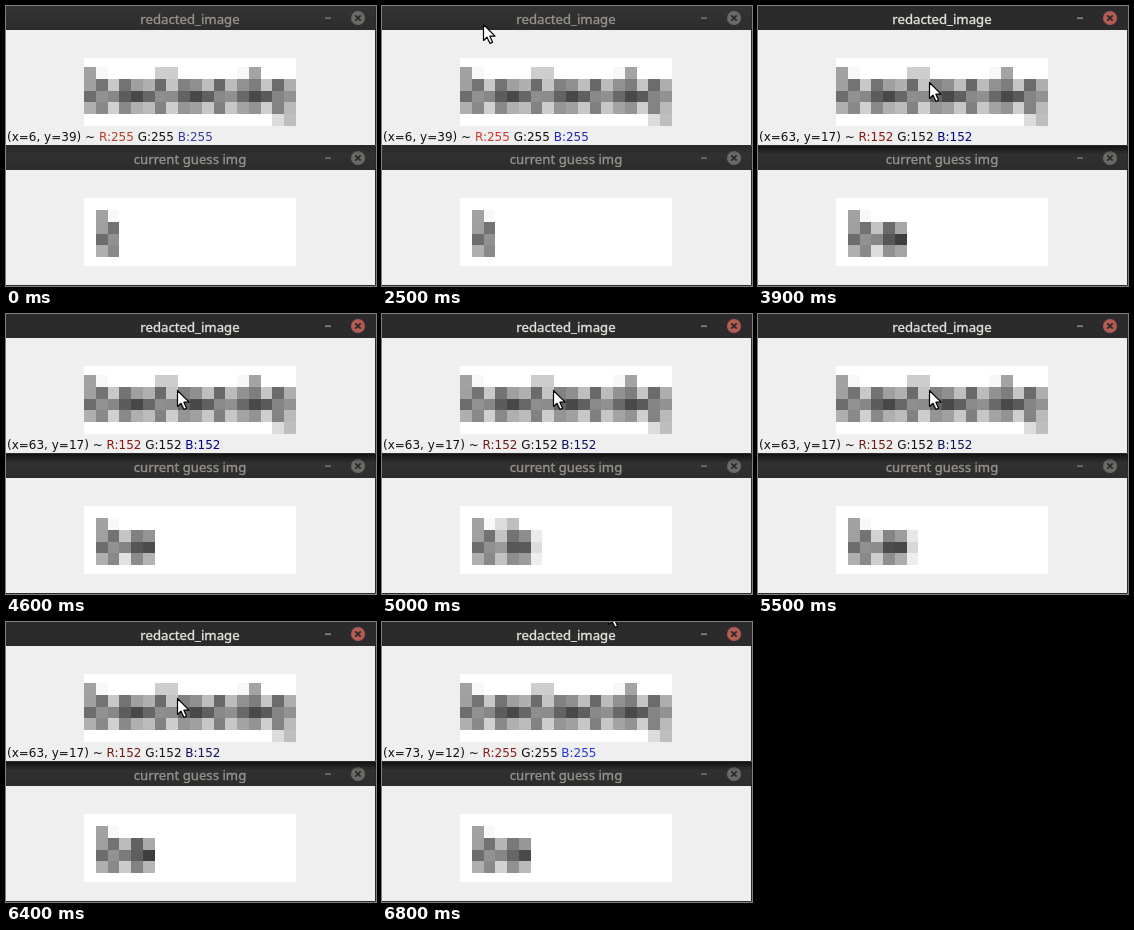
An HTML page that plays this animation: 370 px wide and 280 px high, repeating every 6900 ms.

```html
<!DOCTYPE html>
<html lang="en">
<head>
<meta charset="utf-8">
<style>
html, body { margin: 0; width: 100%; height: 100%; overflow: hidden; background: #efefef; }
svg { display: block; width: 370px; height: 280px; }
.title { font: 500 13.2px "Noto Sans", sans-serif; text-anchor: middle; stroke: currentColor; stroke-width: .35px; fill: currentColor; }
.status { font: 12px "DejaVu Sans", sans-serif; white-space: pre; }
</style>
</head>
<body>
<svg id="stage" viewBox="0 0 370 280" xmlns="http://www.w3.org/2000/svg">
  <defs>
    <linearGradient id="bar" x1="0" y1="0" x2="0" y2="1">
      <stop offset="0" stop-color="#343434"/><stop offset="1" stop-color="#2c2c2c"/>
    </linearGradient>
    <linearGradient id="shade" x1="0" y1="0" x2="0" y2="1">
      <stop offset="0" stop-color="#000" stop-opacity=".65"/><stop offset="1" stop-color="#000" stop-opacity="0"/>
    </linearGradient>
  </defs>
</svg>
<script>
const LOOP = 6900;
const CELL = 11.78;
const COLS = 18;
const stage = document.getElementById("stage");

function add(tag, attrs, parent = stage, text) {
  const node = document.createElementNS("http://www.w3.org/2000/svg", tag);
  for (const key in attrs) node.setAttribute(key, attrs[key]);
  if (text) node.textContent = text;
  return parent.appendChild(node);
}

const clamp = (v, lo, hi) => Math.min(hi, Math.max(lo, v));
const at = (list, t) => list.reduce((hit, item) => item[0] <= t ? item : hit);

function noise(n) {
  const s = Math.sin(n * 12.9898) * 43758.5453;
  return s - Math.floor(s);
}

function makeWindow(y, name) {
  const g = add("g", { transform: `translate(0 ${y})` });
  add("rect", { width: 370, height: 140, fill: "#efefef" }, g);
  const bar = add("rect", { width: 369, height: 24, fill: "url(#bar)" }, g);
  add("path", { d: "M369.5 0V139.5H0", fill: "none", stroke: "#2a2a2a" }, g);
  const title = add("text", { class: "title", x: 184, y: 18, color: "#96928c" }, g, name);
  const dash = add("rect", { x: 319, y: 11.5, width: 6, height: 1.3, fill: "#807e7a" }, g);
  const close = add("circle", { cx: 352, cy: 12, r: 7, fill: "#6c6a67" }, g);
  add("path", { d: "M349.3 9.3l5.4 5.4m0-5.4l-5.4 5.4", stroke: "#2b2b2b", "stroke-width": 1.7 }, g);
  add("rect", { x: 78, y: 52, width: 212, height: 68, fill: "#fff" }, g);
  return { g, bar, title, dash, close };
}

// Strokes one cell wide, averaged over the cells they straddle.
const strokes = (c, places) =>
  255 - 100 * places.reduce((sum, p) => sum + Math.max(0, 1 - Math.abs(c - p)), 0);

// Pixelated writing: letter gaps recur along each row, with tall and hanging strokes around them.
function letterShade(r, c, tall = [.07, 6.5, 13.92]) {
  const gap = Math.cos(2.44 * (c - 2));
  return [
    strokes(c, tall),
    152 + 48 * gap,
    110 + 38 * Math.cos(1.22 * (c - 1.3)),
    168 + 40 * gap,
    strokes(c, [16.65])
  ][r];
}

function drawCells(parent, rows, cols, x0, y0, shade) {
  for (let r = 0; r < rows; r++) for (let c = 0; c < cols; c++) {
    const v = Math.round(clamp(shade(r, c), 0, 255));
    const x = Math.round(x0 + c * CELL), y = Math.round(y0 + r * CELL);
    add("rect", {
      x, y, fill: `rgb(${v},${v},${v})`,
      width: Math.round(x0 + (c + 1) * CELL) - x,
      height: Math.round(y0 + (r + 1) * CELL) - y
    }, parent);
  }
}

// time, width of the guess in cells, places of tall strokes
const guesses = [
  [0, 2, [.07]], [3900, 5, [.07]], [5000, 5.25, [.07, 2.65]], [5200, 5.25, [.07]], [6200, 5, [.07]]
];

// Each new try changes only the last letters.
function drawGuess(t, tick) {
  const [, width, tall] = at(guesses, t);
  cells.replaceChildren();
  drawCells(cells, 4, Math.ceil(width), 78 + CELL, 64, (r, c) => {
    const jitter = r && c > 1 ? 40 * (noise(tick * 31 + r * 7 + c) - .5) : 0;
    const ink = 255 - letterShade(r, c, tall) - jitter;
    return 255 - ink * clamp(width - c, 0, 1);
  });
}

// time, cursor tip
const moves = [
  [0, -50, -50], [2500, 101, 18], [2700, 125, 40], [2800, 150, 62], [2900, 171, 76],
  [6600, 187, 69], [6700, 206, 34], [6800, 226, -14]
];
// time, x, y, value, red ink, blue ink
const readings = [
  [0, 6, 39, 255, "#b33c2a", "#3838a0"],
  [2500, 6, 39, 255, "#d23530", "#2424b6"],
  [2900, 63, 17, 152, "#8c1414", "#00008c"],
  [5000, 63, 17, 152, "#6c1c16", "#10105c"],
  [6600, 73, 12, 255, "#8c1c1c", "#2038d8"]
];

const lower = makeWindow(140, "current guess img");
const cells = add("g", {}, lower.g);
const shadow = add("rect", { y: 140, width: 370, height: 9, fill: "url(#shade)" });
const upper = makeWindow(0, "redacted_image");
drawCells(upper.g, 5, COLS, 78, 61, letterShade_);
function letterShade_(r, c) { return letterShade(r, c); }

const status = add("text", { class: "status", x: 1, y: 135, fill: "#111" });
const [place, red, green, blue] = [0, 1, 2, 3].map(() => add("tspan", {}, status));
const cursor = add("path", {
  d: "M.5 .5V16.5L4 13.2L7 19.4L9.6 18.2L6.9 12.2H12Z",
  fill: "#fff", stroke: "#000", "stroke-width": 1.2, "stroke-linejoin": "round"
});

let lastKey = "";

function render(t) {
  const focused = t >= 3100;
  upper.bar.setAttribute("fill", focused ? "#2b2b2b" : "url(#bar)");
  upper.title.setAttribute("color", focused ? "#e4e2dc" : "#96928c");
  upper.dash.setAttribute("fill", focused ? "#a09e98" : "#807e7a");
  upper.close.setAttribute("fill", focused ? "#b25c54" : "#6c6a67");
  shadow.setAttribute("opacity", focused ? 1 : .35);

  const [, cx, cy] = at(moves, t);
  cursor.setAttribute("transform", `translate(${cx} ${cy})`);

  const [, x, y, value, redInk, blueInk] = at(readings, t);
  place.textContent = `(x=${x}, y=${y}) ~ `;
  red.textContent = `R:${value} `;
  green.textContent = `G:${value} `;
  blue.textContent = `B:${value}`;
  red.setAttribute("fill", redInk);
  blue.setAttribute("fill", blueInk);

  const tick = t < 3900 ? 0 : Math.floor(t / 200);
  const key = tick + ":" + at(guesses, t)[0];
  if (key !== lastKey) {
    lastKey = key;
    drawGuess(t, tick);
  }
}

const begin = performance.now();
function frame() {
  render((performance.now() - begin) % LOOP);
  requestAnimationFrame(frame);
}
frame();
</script>
</body>
</html>
```
